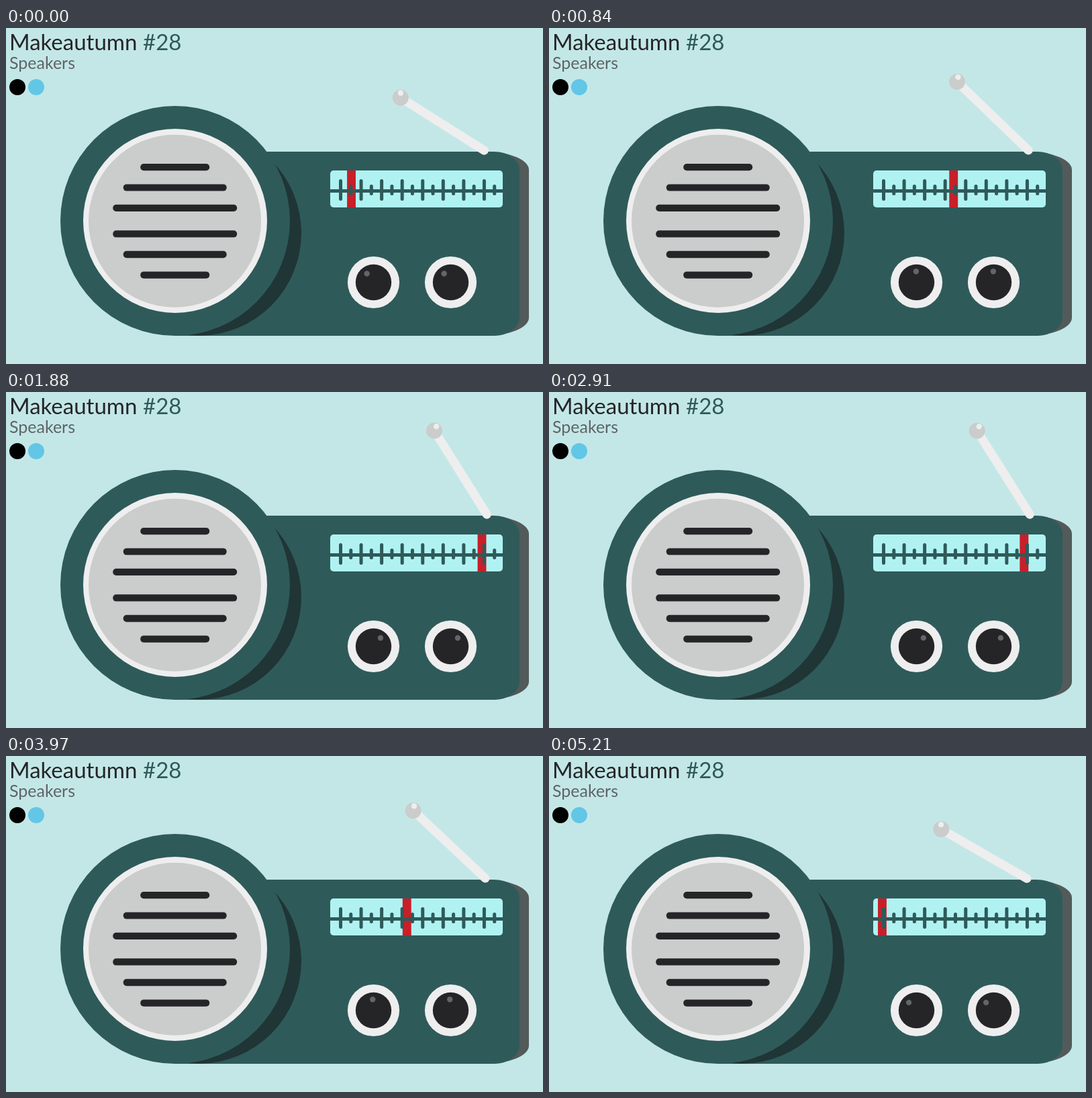
These frames come from a looping animation (800x500 px, 5.27 s). An HTML page with a canvas:

```html
<!DOCTYPE html>
<html lang="en">
<head>
<meta charset="utf-8">
<title>Speakers</title>
<style>
  html, body { margin: 0; width: 100%; height: 100%; overflow: hidden; background: #c3e7e7; }
  canvas, svg { position: absolute; left: 0; top: 0; width: 800px; height: 500px; }
  text { font-family: Quicksand, Lato, sans-serif; }
</style>
</head>
<body>
<canvas id="stage" width="800" height="500"></canvas>
<svg viewBox="0 0 800 500">
  <text x="5" y="33" font-size="33" fill="#252528">Makeautumn</text>
  <text x="204" y="33" font-size="33" fill="#2f5a5a">#28</text>
  <text x="5" y="61" font-size="25" fill="#606468">Speakers</text>
  <circle cx="17" cy="88" r="12" fill="#000"/>
  <circle cx="45" cy="88" r="12" fill="#62c6e6"/>
</svg>
<script>
const ctx = document.getElementById('stage').getContext('2d');
const LOOP = 5270, HALF = 3000, LEAD = 615;
const C = {
  sky: '#c3e7e7', body: '#2f5a5a', side: '#525a5a', shade: '#203535',
  white: '#eeeeee', grey: '#cbcccc', dark: '#252528', dial: '#b0f2f2',
  red: '#c81f29', glint: '#626667'
};

// cubic-bezier(.42, 0, .58, 1)
function easeInOut(x) {
  let lo = 0, hi = 1, s = 0.5;
  for (let i = 0; i < 24; i++) {
    s = (lo + hi) / 2;
    const q = 1 - s;
    if (1.26 * s * q * q + 1.74 * s * s * q + s * s * s < x) lo = s; else hi = s;
  }
  return s * s * (3 - 2 * s);
}

function swing(ms) {
  const u = ((ms + LEAD) / HALF) % 2;
  return easeInOut(u < 1 ? u : 2 - u);
}

function disc(x, y, r, color) {
  ctx.fillStyle = color;
  ctx.beginPath();
  ctx.arc(x, y, r, 0, Math.PI * 2);
  ctx.fill();
}

function box(x, y, w, h, r, color) {
  ctx.fillStyle = color;
  ctx.beginPath();
  ctx.roundRect(x, y, w, h, r);
  ctx.fill();
}

// Panel with elliptical corners on its right side
function panel(right, rx, ry, color) {
  const top = 184, bottom = 458;
  ctx.fillStyle = color;
  ctx.beginPath();
  ctx.moveTo(252, top);
  ctx.lineTo(right - rx, top);
  ctx.ellipse(right - rx, top + ry, rx, ry, 0, -Math.PI / 2, 0);
  ctx.ellipse(right - rx, bottom - ry, rx, ry, 0, 0, Math.PI / 2);
  ctx.lineTo(252, bottom);
  ctx.fill();
}

function speaker() {
  disc(287, 305, 153, C.shade);
  disc(252, 287, 171, C.body);
  disc(252, 287, 137, C.white);
  disc(251.5, 287.3, 128.5, C.grey);
  const widths = [103, 154, 185];
  widths.forEach((w, i) => {
    const x = 251.7 - w / 2;
    box(x, 202 + i * 30.4, w, 10.2, 5, C.dark);
    box(x, 362.4 - i * 30.6, w, 10.4, 5, C.dark);
  });
}

function dial(p) {
  box(483, 212, 257, 55, 5, C.dial);
  ctx.fillStyle = C.red;
  ctx.fillRect(488.5 + 227 * p, 212, 12.9, 55);
  ctx.fillStyle = C.body;
  ctx.fillRect(483, 240, 257, 5);
  for (let i = 0; i < 16; i++) {
    const h = i % 2 ? 16 : 32;
    box(496 + i * 15.28, 241 - h / 2, 5, h, 2.5, C.body);
  }
}

function knob(x, y, p) {
  disc(x, y, 38.6, C.white);
  disc(x, y, 26.7, C.dark);
  const a = (p - 0.5) * Math.PI / 2;
  disc(x + 16.3 * Math.sin(a), y - 16.3 * Math.cos(a), 4.2, C.glint);
}

function antenna(p) {
  ctx.save();
  ctx.translate(714.2, 190.8);
  ctx.rotate(p * Math.PI / 6);
  ctx.strokeStyle = C.white;
  ctx.lineWidth = 13;
  ctx.lineCap = 'round';
  ctx.beginPath();
  ctx.moveTo(-130.2, -81.3);
  ctx.lineTo(-2.2, -8.5);
  ctx.stroke();
  disc(-130.2, -81.3, 12, C.grey);
  disc(-130.5, -88.3, 4.1, C.white);
  ctx.restore();
}

function draw(ms) {
  const p = swing(ms);
  ctx.fillStyle = C.sky;
  ctx.fillRect(0, 0, 800, 500);
  panel(779, 64, 27, C.side);
  panel(765, 38, 27, C.body);
  speaker();
  dial(p);
  knob(547.5, 378.5, p);
  knob(662.5, 378.5, p);
  antenna(p);
}

const start = performance.now();
function tick() {
  draw((performance.now() - start) % LOOP);
  requestAnimationFrame(tick);
}
tick();
</script>
</body>
</html>
```
